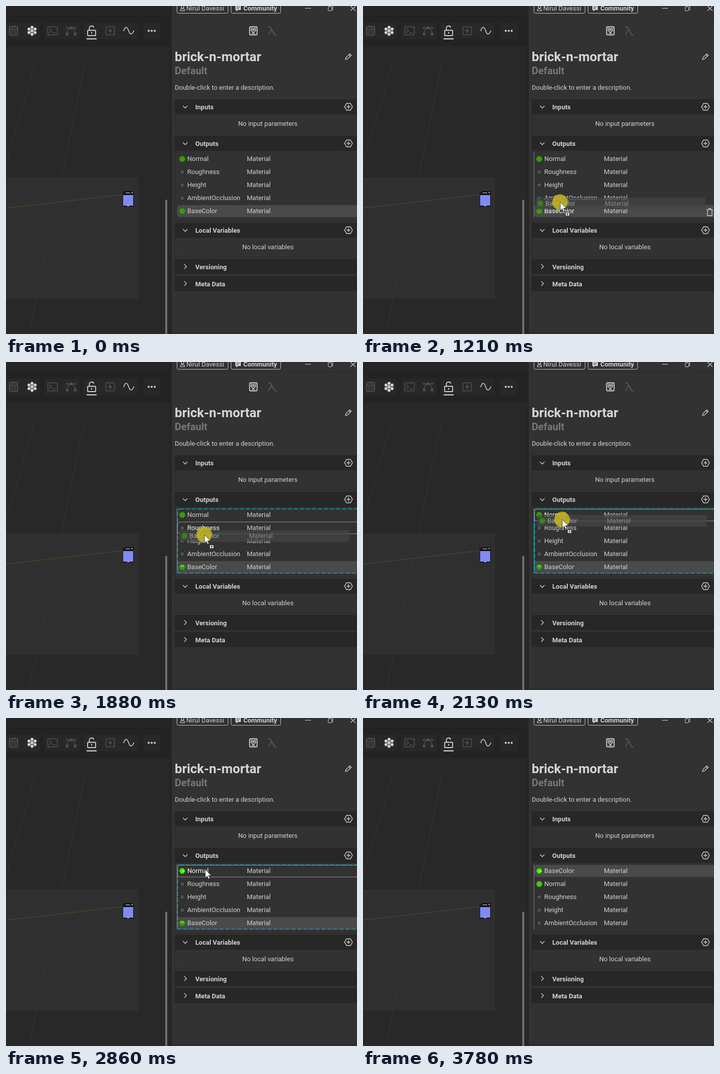
An HTML page with a canvas that plays this animation: 701 px wide and 654 px high, repeating every 4.24 s.

```html
<!DOCTYPE html>
<html lang="en">
<head>
<meta charset="utf-8">
<title>Reordering outputs</title>
<style>
html, body { margin: 0; width: 100%; height: 100%; overflow: hidden; background: #282828; }
canvas { display: block; }
</style>
</head>
<body>
<canvas id="stage" width="701" height="654"></canvas>
<script>
const ctx = document.getElementById('stage').getContext('2d');
const LOOP = 4240;
const BRIGHT = '#d2d2d2', DIM = '#505050', HEAD = '#272727', PANEL = '#323232';
const GREEN = '#3a9a0c', LIME = '#40f00a';
const PRESS = 890, FOCUS = 930, DRAG = 1090, TARGET = 1290, DROP = 2860, SORTED = 2950;
const SHOW = 40, HIDE = 3780;

// Pointer path: time, x, y
const PATH = [
  [40, 470, 645], [160, 450, 558], [300, 437, 450], [560, 394, 391], [610, 393, 400],
  [720, 391, 405], [1090, 391, 405], [1210, 394, 391], [1600, 395, 366], [1650, 395, 366],
  [2130, 398, 314], [2160, 398, 313], [2200, 398, 313], [2450, 398, 302],
  [3440, 398, 302], [3600, 428, 450], [3780, 462, 645]
];
const BEFORE = ['Normal', 'Roughness', 'Height', 'AmbientOcclusion', 'BaseColor'];
const AFTER = ['BaseColor', 'Normal', 'Roughness', 'Height', 'AmbientOcclusion'];

function rect(x, y, w, h, fill) {
  ctx.fillStyle = fill;
  ctx.fillRect(x, y, w, h);
}

function box(x, y, w, h, r, fill, stroke, width = 1) {
  ctx.beginPath();
  ctx.roundRect(x, y, w, h, r);
  paint(fill, stroke, width);
}

function paint(fill, stroke, width) {
  if (fill) { ctx.fillStyle = fill; ctx.fill(); }
  if (stroke) { ctx.strokeStyle = stroke; ctx.lineWidth = width; ctx.stroke(); }
}

function line(points, color, width = 1) {
  ctx.beginPath();
  for (let i = 0; i < points.length; i += 2) ctx.lineTo(points[i], points[i + 1]);
  paint(null, color, width);
}

function disc(x, y, r, fill, stroke, width) {
  ctx.beginPath();
  ctx.arc(x, y, r, 0, 7);
  paint(fill, stroke, width);
}

function curve(d, fill, stroke, width = 1.5) {
  const p = new Path2D(d);
  if (fill) { ctx.fillStyle = fill; ctx.fill(p); }
  if (stroke) { ctx.strokeStyle = stroke; ctx.lineWidth = width; ctx.stroke(p); }
}

function text(s, x, y, color = BRIGHT, size = 13, weight = 400, align = 'left') {
  ctx.font = `${weight} ${size}px Roboto, sans-serif`;
  ctx.textAlign = align;
  ctx.fillStyle = color;
  ctx.fillText(s, x, y);
}

function hex(x, y, r, fill, stroke, width = 1) {
  ctx.beginPath();
  for (let i = 0; i < 6; i++) {
    const a = i * Math.PI / 3;
    ctx.lineTo(x + r * Math.cos(a), y + r * Math.sin(a));
  }
  ctx.closePath();
  paint(fill, stroke, width);
}

function drawGraph() {
  rect(0, 0, 331, 654, '#282828');
  rect(0, 0, 329, 20, '#252525');
  rect(0, 20, 329, 60, '#232323');
  rect(0, 20, 329, 1, '#1f1f1f');
  rect(0, 342, 264, 242, '#2f2f2f');
  line([58, 118, 0, 315], '#363636');
  line([157, 118, 46, 654], '#363636');
  ctx.setLineDash([3, 1]);
  line([0, 403, 235, 376], '#3b6b25');
  ctx.setLineDash([]);
  rect(233, 369, 22, 31, '#15151c');
  rect(234, 377, 20, 21, '#818bf6');
  rect(239, 372, 9, 1, '#ddd');
  rect(251, 371, 2, 2, '#ddd');
  rect(242, 398, 4, 1, '#eee');
  rect(234, 370, 2, 1, '#777');
  box(318, 386, 4, 280, 2, '#707070');
  rect(328, 0, 3, 654, '#242424');
}

function drawToolbar() {
  for (const [x, w] of [[-4, 71], [77, 70], [155, 108], [275, 33]]) box(x, 33, w, 33, 4, '#282828');

  box(7, 40.5, 16, 18, 3, null, DIM, 2);
  rect(8, 45, 14, 2, DIM);
  rect(10, 42, 10, 1, DIM);
  box(10.5, 49.5, 9, 5, 1, null, DIM, 1.5);

  disc(52, 49.5, 2.4, BRIGHT);
  for (let i = 0; i < 6; i++) {
    const a = i * Math.PI / 3 + Math.PI / 6;
    const x = 52 + 7 * Math.cos(a), y = 49.5 + 7 * Math.sin(a);
    line([52, 49.5, x, y], BRIGHT, 1.6);
    disc(x, y, 3, BRIGHT);
  }

  box(83.5, 41.5, 19, 16, 1, null, DIM, 1.6);
  line([87, 45.5, 91, 49.5, 87, 53.5], DIM, 1.6);
  line([93, 53.5, 99, 53.5], DIM, 1.6);

  line([122, 43.5, 138, 43.5], DIM, 1.4);
  curve('M122 55 C122 48 126 44 130 44 C134 44 138 48 138 55', null, DIM);
  for (const [x, y] of [[121.5, 43.5], [138.5, 43.5]]) disc(x, y, 1.8, DIM);
  for (const [x, y] of [[130, 43.5], [122, 56], [138, 56]]) rect(x - 2.5, y - 2.5, 5, 5, DIM);

  box(163, 48.5, 16, 10.5, 1, null, BRIGHT, 1.8);
  curve('M166.5 48 V44.5 A4.5 4.5 0 0 1 175.3 43', null, BRIGHT, 1.8);
  rect(170, 52, 2, 3, BRIGHT);
  rect(161, 64.5, 20, 2, '#e4e4e4');

  box(199.5, 41.5, 17, 16, 1, null, DIM, 1.6);
  curve('M209.5 43.5 L203.5 50.5 H207.5 L206.5 55.5 L212.5 48.5 H208.5 Z', DIM);
  curve('M235 50 C238 40 242 40 245 49.5 C248 59 252 57 255.5 49', null, BRIGHT, 1.6);
  for (const x of [285, 291, 297]) disc(x, 49.5, 2, BRIGHT);
}

function drawTopBar() {
  rect(331, 0, 370, 654, PANEL);
  rect(331, 20, 370, 1, '#292929');
  rect(331, 650, 370, 4, '#2d2d2d');
  box(341.5, -8.5, 102, 23, 3, null, '#c4c4c4');
  disc(352.5, 1.5, 2.6, null, BRIGHT, 1.2);
  curve('M348.5 9.5 V8 Q348.5 5.5 352.5 5.5 Q356.5 5.5 356.5 8 V9.5 Z', null, BRIGHT, 1.2);
  text('Nirul Davessi', 360, 9, BRIGHT, 13);
  box(449.5, -8.5, 99, 23, 3, null, '#c4c4c4');
  curve('M458 -1 H469 V8 H463 L460 11 V8 H458 Z', BRIGHT);
  line([460, 2, 467, 2], PANEL);
  line([460, 5, 465, 5], PANEL);
  text('Community', 474, 9, BRIGHT, 13, 700);

  line([597, 4.5, 609, 4.5], BRIGHT);
  box(643.5, 1.5, 7, 8, 1, null, BRIGHT);
  curve('M645.5 1 V-0.5 H652.5 V7.5 H651', null, BRIGHT, 1);
  line([688, 0, 698, 9.5], BRIGHT, 1.1);
  line([698, 0, 688, 9.5], BRIGHT, 1.1);

  box(486.5, 41.5, 15, 16, 2, null, BRIGHT, 1.8);
  for (const x of [491, 497]) disc(x, 46, 1.8, null, BRIGHT, 1.3);
  curve('M488.5 48 L494 53 L499.5 48 M491 54.5 H497 M494 45 V50', null, BRIGHT, 1.4);
  curve('M524 42 H528 L537 57.5 H540 M530.5 47 L524 57.5', null, '#565656', 2);
}

function header(y, label, open) {
  rect(337, y, 364, 30, HEAD);
  const c = y + 15;
  if (open) {
    line([353.5, c - 2, 358, c + 2.5, 362.5, c - 2], BRIGHT, 1.3);
    hex(684, c, 7.8, null, BRIGHT, 1.4);
    line([680, c, 688, c], BRIGHT, 1.4);
    line([684, c - 4, 684, c + 4], BRIGHT, 1.4);
  } else {
    line([356, c - 4.5, 360.5, c, 356, c + 4.5], BRIGHT, 1.3);
  }
  text(label, 378, y + 20, BRIGHT, 13, 700);
}

function section(y, h, label) {
  box(337.5, y + .5, 370, h, 0, PANEL, '#2a2a2a');
  header(y, label, true);
}

function drawPanel() {
  text('brick-n-mortar', 337, 110, '#d6d6d6', 26, 700);
  text('Default', 337, 136, '#777', 20, 700);
  text('Double-click to enter a description.', 337, 167);
  curve('M678 106.5 L679 102.8 L686.5 95.3 L689.5 98.3 L682 105.6 Z M684.8 97 L687.8 100', null, BRIGHT, 1.3);
  section(186, 68, 'Inputs');
  text('No input parameters', 523, 239, BRIGHT, 13, 400, 'center');
  section(259, 169, 'Outputs');
  section(432, 68, 'Local Variables');
  text('No local variables', 523, 485, BRIGHT, 13, 400, 'center');
  header(504.5, 'Versioning', false);
  header(538.5, 'Meta Data', false);
}

function port(x, y, color) {
  if (!color) return hex(x, y, 5, '#4f4f4f', '#262626', 1.3);
  hex(x, y, 6.5, color, '#2b5e14', .7);
}

function litPort(x, y) {
  hex(x, y, 6.2, LIME, '#247a08', 1);
  disc(x + 2, y + .5, 1.6, '#b6ff9c');
}

function trash(y) {
  line([686.5, y - 5, 698.5, y - 5], BRIGHT, 1.3);
  curve(`M690.5 ${y - 5} V${y - 7} H694.5 V${y - 5} M688 ${y - 5} V${y + 7} H697 V${y - 5}`, null, BRIGHT, 1.3);
}

function drawRows(t, hover, canDelete) {
  const names = t < SORTED ? BEFORE : AFTER;
  names.forEach((name, i) => {
    const y = 305 + 26 * i;
    if (name === 'BaseColor') box(342, y - 12, 370, 24, 5, '#4a4a4a');
    const sorted = t >= SORTED;
    if (i === 0 && t >= DROP) litPort(352, y);
    else if (name === 'Normal') port(352, y, sorted ? '#4cc414' : GREEN);
    else if (name === 'BaseColor') {
      port(352, y, GREEN);
      if (t >= TARGET) box(348.5, y - 3.5, 7, 3, 1, '#72d043');
    } else port(352, y);
    text(name, 362, y + 4, i === hover ? '#fff' : BRIGHT);
    text('Material', 481, y + 4);
    if (i === hover && canDelete) trash(y + 4 - (i ? 0 : 1) - 3 + (i === 4 ? 1 : 0));
  });
}

function drawDropZone(row) {
  ctx.setLineDash([9, 3]);
  box(342.5, 293, 370, 128, 4, null, '#00a9c8', 1.7);
  ctx.setLineDash([]);
  box(342.5, 293.5 + 26 * row - (row ? 0.5 : 0), 370, 23.5, 4, null, '#929292');
}

function drawGhost(x, y) {
  ctx.save();
  ctx.globalAlpha = .7;
  rect(x - 50, y - 9, 339, 23, '#454545');
  port(x - 40, y + 2.5, GREEN);
  text('BaseColor', x - 30, y + 7);
  text('Material', x + 89, y + 7, '#aaa');
  ctx.restore();
}

function drawPointer(x, y, badge) {
  ctx.save();
  ctx.translate(x, y);
  curve('M0 0 V16.5 L3.8 12.9 L6.4 18.8 L9 17.7 L6.5 12 H11.8 Z', '#fff', '#222', .8);
  if (badge) {
    rect(10, 20, 9, 8, '#222');
    rect(11, 21, 7, 6, '#fff');
    line([12, 24, 17, 24], '#222');
    line([14.5, 21.5, 14.5, 26.5], '#222');
  }
  ctx.restore();
}

function pointerAt(t) {
  let i = 0;
  while (i < PATH.length - 2 && t >= PATH[i + 1][0]) i++;
  const [t0, x0, y0] = PATH[i], [t1, x1, y1] = PATH[i + 1];
  if (t1 - t0 <= 50) return [x0, y0];
  const held = Math.floor((t - t0) / 40) * 40;
  const k = Math.max(0, Math.min(1, held / (t1 - t0)));
  return [x0 + (x1 - x0) * k, y0 + (y1 - y0) * k];
}

function rowAt(y) {
  const row = Math.floor((y - 293) / 26);
  return row >= 0 && row < 5 ? row : -1;
}

function draw(t) {
  const visible = t >= SHOW && t < HIDE;
  const [x, y] = pointerAt(t);
  const dragging = t >= DRAG && t < DROP;
  const dropZone = t >= TARGET && t < SORTED;
  let hover = visible ? rowAt(y) : -1;
  if (t >= PRESS && t < TARGET) hover = 4;

  drawGraph();
  drawToolbar();
  drawTopBar();
  drawPanel();
  if (t >= FOCUS) rect(341, 292, 1, 130, '#777');
  drawRows(t, hover, !dropZone);
  if (dropZone) drawDropZone(rowAt(y));
  if (dragging) drawGhost(x, y);
  if (t >= PRESS && t < DROP) disc(x - .5, y, 15.5, 'rgba(196,184,30,.85)');
  if (visible) drawPointer(x, y, dragging);
}

const start = performance.now();
function tick() {
  draw((performance.now() - start) % LOOP);
  requestAnimationFrame(tick);
}
tick();
</script>
</body>
</html>
```
